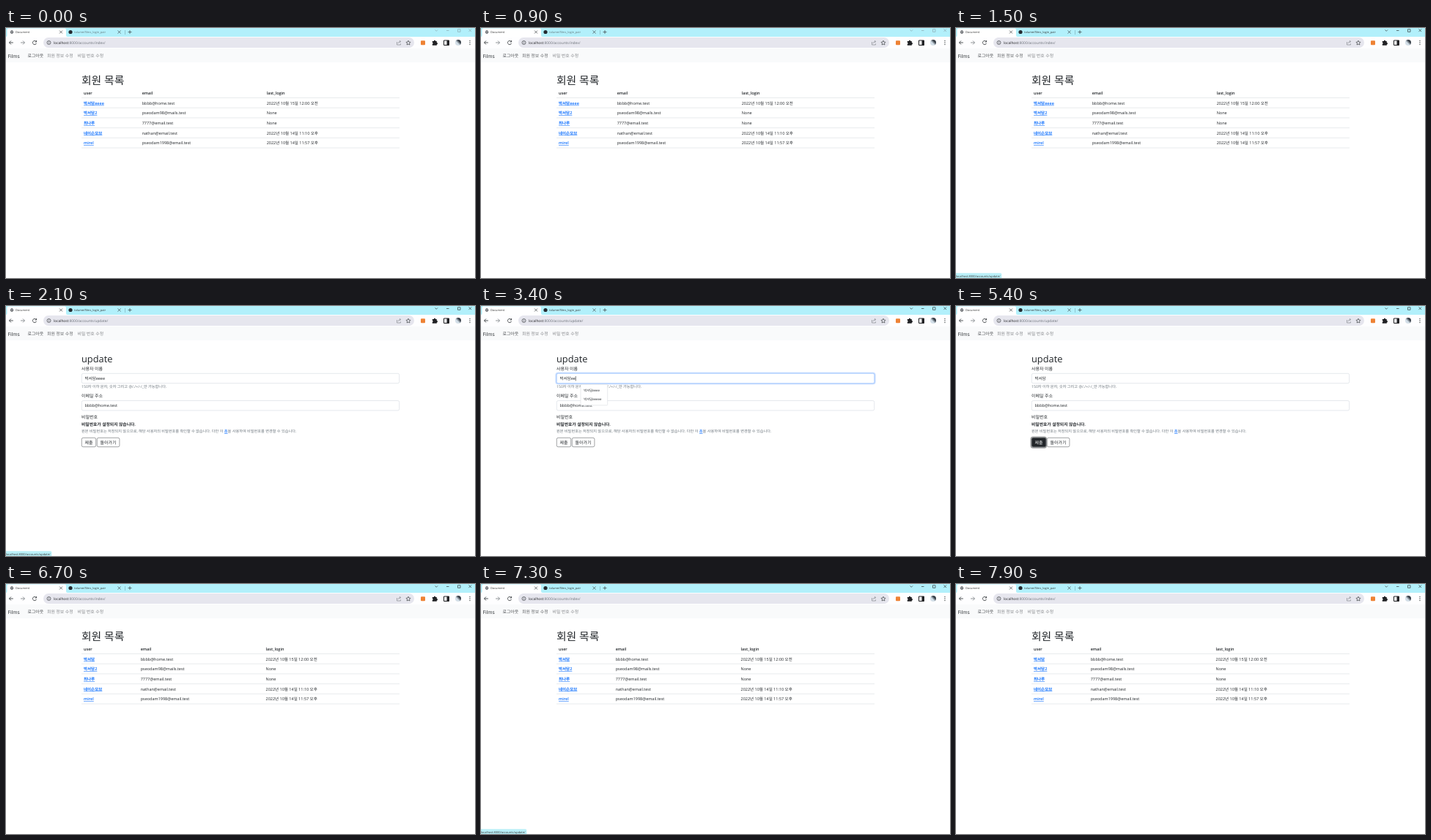
Write an HTML page that moves like this. It is 640 px wide and 342 px high and loops after 8 s.

```html
<!DOCTYPE html>
<html lang="ko">
<head>
<meta charset="utf-8">
<title>Document</title>
<style>
html, body { margin: 0; width: 100%; height: 100%; overflow: hidden; background: #fff; }
svg { display: block; width: 640px; height: 342px; }
text { font: 5.5px "Open Sans", "Noto Sans CJK KR", "Noto Sans KR", "Noto Sans CJK", sans-serif;
  fill: #212529; text-rendering: geometricPrecision; white-space: pre; }
.h { font-size: 14.8px; }
.h.latin { font-size: 12.8px; }
.label { font-size: 5.95px; }
.b, .user { font-weight: 600; }
.user { font-size: 5.5px; }
.user, .link { fill: #0d6efd; text-decoration: underline; }
.help { font-size: 5.18px; fill: #6c757d; }
.tab { font-size: 3.95px; fill: #333; }
.url { font-size: 4.85px; fill: #6b7078; }
.nav { font-size: 5.9px; fill: #85878b; }
.opt { font-size: 4.35px; }
.field { fill: #fff; stroke: #d3d9df; stroke-width: .6; }
.btn { fill: #fff; stroke: #43474b; stroke-width: .5; }
.rule { stroke: #dee2e6; stroke-width: .7; }
.ico { fill: none; stroke: #3c4043; stroke-width: .9; }
.thin { stroke-width: .7; }
</style>
</head>
<body>
<svg viewBox="0 0 640 342">
  <defs>
    <linearGradient id="photo" x1="1" y1="0" x2="0" y2="1">
      <stop offset=".3" stop-color="#333b44"/><stop offset=".6" stop-color="#d3dfe8"/>
    </linearGradient>
  </defs>

  <!-- tab strip -->
  <rect width="640" height="12" fill="#b2f0fb"/>
  <path d="M0 12Q1.500 12 1.500 10V2.500Q1.500 .5 3.500 .5H80Q82 .5 82 2.500V10Q82 12 84 12Z" fill="#fff"/>
  <circle cx="8" cy="5.500" r="2.200" fill="#5f6368"/>
  <path class="ico thin" d="M6.500 4.800L8 5.800 9.600 4.600" style="stroke:#fff"/>
  <text class="tab" x="13" y="7">Document</text>
  <circle cx="88" cy="5.500" r="2.600" fill="#24292f"/>
  <text class="tab" id="tab2" x="93" y="7">tolume/films_login_pair</text>
  <path class="ico thin" d="M73 3.500l4 4m0-4l-4 4M152.500 3.500l4 4m0-4l-4 4M166.500 5.500h5m-2.500-2.500v5"/>
  <path d="M162.500 3v6" stroke="#7aa9b4" stroke-width=".6"/>
  <path class="ico thin" id="controls" d="M585.500 2.500l1.800 1.800 1.800-1.800M601 3.500h3.500M616.500 1.800h3.500v3.500h-3.500zM631.500 1.500l3.600 3.600m0-3.600l-3.600 3.600"/>

  <!-- toolbar -->
  <rect y="12" width="640" height="16" fill="#fefeff"/>
  <rect x="51" y="13" width="506" height="14" rx="7" fill="#e6e6ee"/>
  <path class="ico" d="M9.800 20H4.500m2.400-2.500L4.400 20l2.500 2.500"/>
  <path class="ico" d="M20 20h5.500m-2.500-2.500l2.500 2.500-2.500 2.500" style="stroke:#85898e"/>
  <path class="ico" d="M41.200 18.600a2.600 2.600 0 1 0 .3 2.300M41.600 17v2h-2"/>
  <circle class="ico thin" cx="58.500" cy="20" r="2.500"/>
  <path class="ico thin" d="M58.500 19.700v1.700m0-3.100v.7"/>
  <text class="url" x="65" y="22"><tspan fill="#202124">localhost</tspan><tspan id="path"></tspan></text>
  <path class="ico thin" d="M533.500 19v4h5v-1.500M535 21q.5-2.500 3.500-2.500m-1.500-1.500l1.700 1.500-1.700 1.500" style="stroke:#85898e"/>
  <path class="ico thin" d="M549 17.200l.9 1.900 2.100.3-1.500 1.500.4 2.100-1.900-1-1.900 1 .4-2.100-1.500-1.500 2.100-.3z"/>
  <rect x="566" y="17.200" width="6" height="6" rx="1" fill="#ee8235"/>
  <path d="M581.800 18h2a1.200 1.200 0 0 1 2.400 0h1.600v2a1.200 1.200 0 0 1 0 2.400v1.400h-6v-1.800a1.200 1.200 0 0 0 0-2.300z" fill="#202124"/>
  <path d="M597.500 17h7v6.500h-7z" fill="none" stroke="#202124" stroke-width="1"/>
  <path d="M601.500 17h3v6.500h-3z" fill="#202124"/>
  <circle cx="617" cy="20" r="4" fill="url(#photo)"/>
  <path d="M633 17.500v.01m0 2.490v.01m0 2.490v.01" stroke="#3c4043" stroke-width="1.300" stroke-linecap="round"/>

  <!-- site navigation -->
  <rect y="28" width="640" height="19" fill="#f9fafb"/>
  <text x="2.500" y="40.500" style="font-size:6.700px">Films</text>
  <text class="nav" x="29.500" y="40" style="fill:#4b4d50">로그아웃</text>
  <text class="nav" id="navUpdate" x="56" y="40">회원 정보 수정</text>
  <text class="nav" x="97.500" y="40">비밀 번호 수정</text>

  <g id="index">
    <text class="h" x="103" y="77">회원 목록</text>
  </g>

  <g id="update">
    <text class="h latin" x="103" y="77">update</text>
    <text class="label" x="103" y="88">사용자 이름</text>
    <rect id="ring" x="102.300" y="91.500" width="435.400" height="15" rx="2.800" fill="none" stroke="#0d6efd" stroke-opacity=".25" stroke-width="1.600"/>
    <rect class="field" id="name" x="103.300" y="92.300" width="433.400" height="13.400" rx="2"/>
    <text id="value" x="107.500" y="101"></text>
    <path id="caret" d="M0 96v6.500" stroke="#212529" stroke-width=".6"/>
    <text class="help" x="103" y="112">150자 이하 문자, 숫자 그리고 @/./+/-/_만 가능합니다.</text>
    <text class="label" x="103" y="125">이메일 주소</text>
    <rect class="field" x="103.300" y="129.500" width="433.400" height="13.400" rx="2"/>
    <text x="107.500" y="138">bbbb@home.test</text>
    <text class="label" x="103" y="154">비밀번호</text>
    <text class="b" x="103" y="164.300" style="font-size:5.800px">비밀번호가 설정되지 않습니다.</text>
    <text class="help" x="103" y="173">원본 비밀번호는 저장되지 않으므로, 해당 사용자의 비밀번호를 확인할 수 없습니다. 다만 이 <tspan class="link">폼</tspan>을 사용하여 비밀번호를 변경할 수 있습니다.</text>
    <rect id="glow" x="102.300" y="179.300" width="21" height="14.600" rx="2.800" fill="none" stroke="#212529" stroke-opacity=".45" stroke-width="1.600"/>
    <rect class="btn" id="submit" x="103.300" y="180.300" width="19.400" height="12.400" rx="2"/>
    <text class="label" id="submitText" x="107.500" y="188.600">제출</text>
    <rect class="btn" x="124.300" y="180.300" width="30.600" height="12.400" rx="2"/>
    <text class="label" x="128.500" y="188.600">돌아가기</text>
    <g id="options">
      <rect x="136" y="107.300" width="36.700" height="28.500" rx="1" fill="#fff" stroke="#d9dce0" stroke-width=".6"/>
      <text class="opt" x="140.200" y="116.900">박서담eeee</text>
      <text class="opt" x="140.200" y="129.200">박서담eeeee</text>
    </g>
  </g>

  <g id="status">
    <path d="M0 335.300H60.500Q62.300 335.300 62.300 337V342H0Z" fill="#baf0f8"/>
    <text class="tab" x="0" y="340.500">localhost:8000/accounts/update/</text>
  </g>
</svg>
<script>
const $ = id => document.getElementById(id);
const show = (id, on) => $(id).style.display = on ? "" : "none";
const ramp = (t, start, length) => Math.min(1, Math.max(0, (t - start) / length));
const mix = (a, b, k) => `rgb(${a.map((v, i) => Math.round(v + (b[i] - v) * k))})`;
const WHITE = [255, 255, 255], DARK = [33, 37, 41];
const NAME = "박서담";

const rows = [
  ["user", "email", "last_login"],
  [NAME, "bbbb@home.test", "2022년 10월 15일 12:00 오전"],
  [NAME + "2", "pseodam98@mails.test", "None"],
  ["최나루", "7777@email.test", "None"],
  ["네이슨모브", "nathan@email.test", "2022년 10월 14일 11:10 오후"],
  ["mirel", "pseodam1998@email.test", "2022년 10월 14일 11:57 오후"]
];

function add(tag, attrs, text = "") {
  const el = document.createElementNS("http://www.w3.org/2000/svg", tag);
  for (const key in attrs) el.setAttribute(key, attrs[key]);
  el.textContent = text;
  $("index").append(el);
  return el;
}

const cells = rows.map((row, r) => {
  const y = 91 + r * 13.65;
  add("path", { class: "rule", d: `M103 ${95.5 + r * 13.7}H537` });
  return row.map((text, c) =>
    add("text", { class: r ? (c ? "" : "user") : "b", x: 106, y }, text));
});

function layoutTable(saved) {
  const columns = saved ? [106, 183.7, 354.5] : [106, 185.7, 355.7];
  cells.forEach(row => row.forEach((cell, c) => cell.setAttribute("x", columns[c])));
  cells[1][0].textContent = NAME + (saved ? "" : "eeee");
}

function typedName(t) {
  const count = t < 3400 ? 4 : Math.max(0, 2 - Math.floor((t - 3400) / 100));
  return NAME + "e".repeat(count);
}

function draw(t) {
  const editing = t >= 1600 && t < 5600;
  show("index", !editing);
  show("update", editing);
  $("path").textContent = `:8000/accounts/${editing ? "update" : "index"}/`;

  const active = t >= 1200;
  $("controls").style.stroke = active ? "#333a3d" : "#8cabb2";
  $("tab2").style.fill = active ? "#333" : "#64777c";

  const hover = (t >= 600 && t < 2200) || (t >= 6800 && t < 7500);
  $("navUpdate").style.fill = hover ? "#5d5f62" : "";
  $("status").style.opacity = t < 4000
    ? ramp(t, 1100, 200) - ramp(t, 2100, 300)
    : ramp(t, 6800, 200) - ramp(t, 7400, 300);

  if (!editing) return layoutTable(t >= 5600);

  const focus = ramp(t, 2300, 200) - ramp(t, 4400, 200);
  $("ring").style.opacity = focus;
  $("name").style.stroke = mix([211, 217, 223], [134, 183, 254], focus);
  $("value").textContent = typedName(t);
  show("caret", focus > 0 && (t < 3400 ? t % 1000 < 500 : (t - 3400) % 1000 < 600));
  const end = 107.9 + $("value").getComputedTextLength();
  $("caret").setAttribute("transform", `translate(${end})`);
  show("options", t >= 3400 && t < 3900);

  const press = ramp(t, 4500, 200);
  $("submit").style.fill = mix(WHITE, DARK, press);
  $("submitText").style.fill = mix(DARK, WHITE, press);
  $("glow").style.opacity = ramp(t, 5100, 200);
}

function tick() {
  draw(Math.floor(performance.now() % 8000 / 100) * 100);
  requestAnimationFrame(tick);
}
tick();
</script>
</body>
</html>
```
